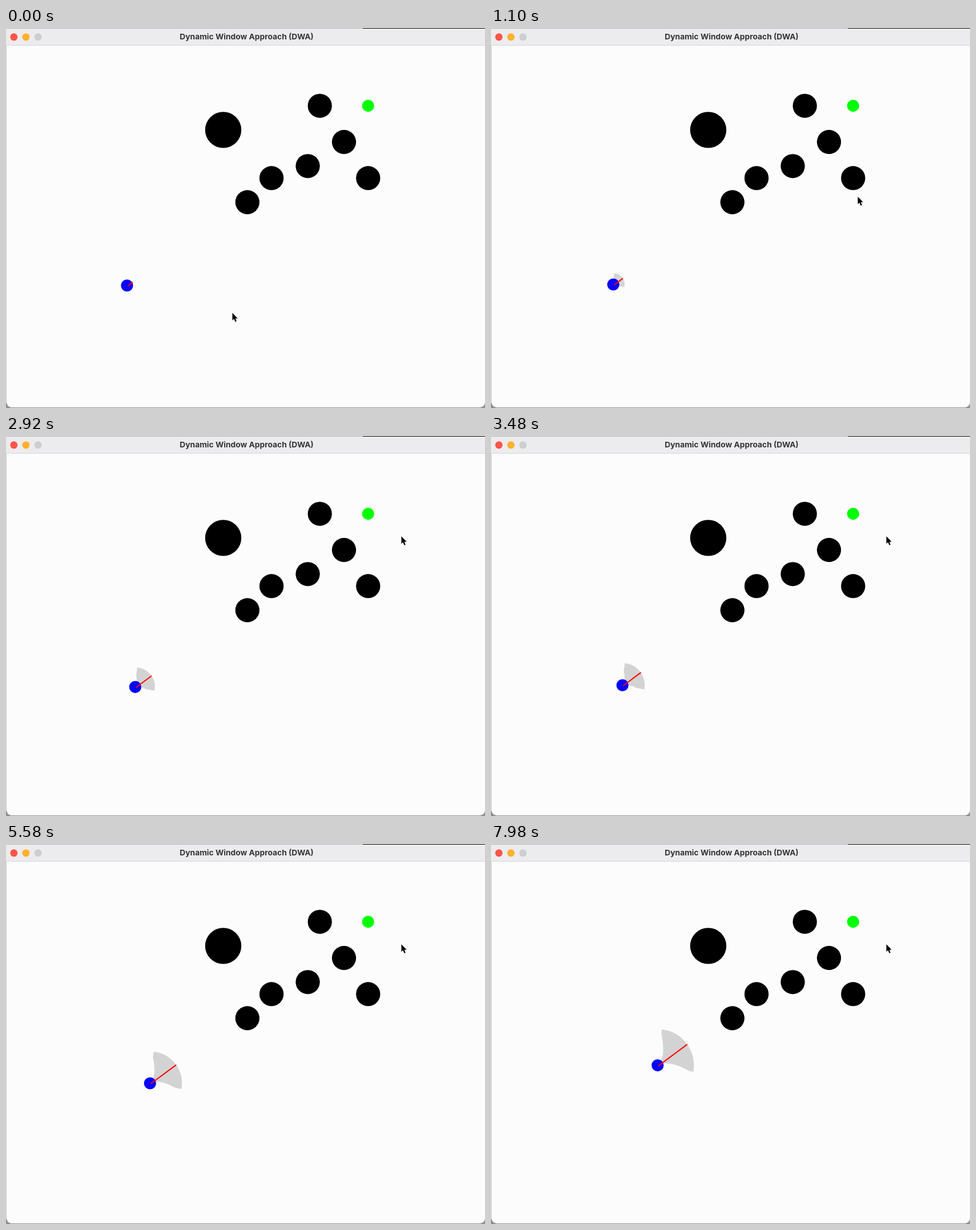
An HTML page with a canvas that plays this animation: 839x667 px, repeating every 8000 ms.

```html
<!DOCTYPE html>
<html lang="en">
<head>
<meta charset="utf-8">
<title>Dynamic Window Approach</title>
<style>
  html, body { margin: 0; width: 100%; height: 100%; overflow: hidden; background: #fcfcfd; }
  canvas { display: block; }
</style>
</head>
<body>
<canvas id="stage" width="839" height="667"></canvas>
<script>
const ctx = document.getElementById('stage').getContext('2d');
const LOOP = 8;        // seconds
const CELL = 21.15;    // pixels per world unit
const TITLE_BAR = 30.8;
const COURSE = -0.671; // direction of travel
const HEADING = -0.64; // direction of the look-ahead line

// seconds, distance driven
const driven = [[0, 0], [1.1, 2.8], [1.94, 12.1], [2.92, 18.4], [4.36, 31.2], [6.74, 70.7], [7.98, 102]];
// seconds, pointer position
const pointerPath = [[0, 396, 499], [1.1, 642, 295], [1.94, 655, 181], [2.2, 692, 175]];
// world column and row
const obstacles = [[26, 5], [28, 8], [30, 11], [25, 10], [22, 11], [20, 13]];

const linear = k => k;
const smooth = k => k * k * (3 - 2 * k);

function sample(keys, t, ease) {
  const next = keys.findIndex(key => key[0] > t);
  if (next < 0) return keys[keys.length - 1].slice(1);
  const a = keys[next - 1], b = keys[next];
  const k = ease((t - a[0]) / (b[0] - a[0]));
  return a.slice(1).map((v, i) => v + (b[i + 1] - v) * k);
}

function disc(x, y, r, color) {
  ctx.fillStyle = color;
  ctx.beginPath();
  ctx.arc(x, y, r, 0, Math.PI * 2);
  ctx.fill();
}

function worldDisc(column, row, r, color) {
  disc(column * CELL - 0.2, row * CELL + TITLE_BAR, r * CELL, color);
}

function rect(x, y, w, h, color) {
  ctx.fillStyle = color;
  ctx.fillRect(x, y, w, h);
}

function drawWindow() {
  rect(0, 0, 839, 667, '#8f8f90');
  rect(0, 30, 1, 628, '#c9c9cb');
  ctx.fillStyle = '#fcfcfd';
  ctx.beginPath();
  ctx.roundRect(1, 1, 838, 665, [0, 0, 9, 9]);
  ctx.fill();
  rect(0, 0, 839, 30, '#ececee');
  rect(0, 30, 839, 1, '#d6d6d7');
  rect(0, 0, 625, 1, '#b4b4b8');
  rect(625, 0, 214, 1, '#000');
  ['#ff5449', '#ffb02c', '#cbcfd0'].forEach((color, i) => disc(13.8 + i * 21.1, 15.8, 6.5, color));
  ctx.fillStyle = '#343436';
  ctx.font = '700 13.8px Inter, sans-serif';
  ctx.textAlign = 'center';
  ctx.fillText('Dynamic Window Approach (DWA)', 421.5, 20);
}

// Reachable area, drawn along the x axis with its origin at the robot
function drawFan(length) {
  const spread = 0.8;
  const depth = Math.max(7, Math.min(14, 14 - (length - 46) * 0.41));
  const inner = Math.max(2, length - depth);
  const ix = inner * Math.cos(spread), iy = inner * Math.sin(spread);
  ctx.beginPath();
  ctx.moveTo(0, 0);
  ctx.quadraticCurveTo(inner * 0.37, 0, ix, -iy);
  ctx.arc(0, 0, length - 1, -spread, spread);
  ctx.lineTo(ix, iy);
  ctx.quadraticCurveTo(inner * 0.37, 0, 0, 0);
  ctx.fillStyle = ctx.strokeStyle = '#d3d3d3';
  ctx.lineWidth = 2;
  ctx.lineJoin = 'round';
  ctx.fill();
  ctx.stroke();
}

function drawRobot(t) {
  const [distance] = sample(driven, t, linear);
  const length = Math.min(63.5, 11 + 8.05 * t);
  ctx.save();
  ctx.translate(212 + distance * Math.cos(COURSE), 452 + distance * Math.sin(COURSE));
  ctx.save();
  ctx.rotate(HEADING);
  if (length > 13) drawFan(length);
  ctx.restore();
  disc(0, 0, CELL / 2, '#00f');
  ctx.strokeStyle = '#f00';
  ctx.lineWidth = 2;
  ctx.beginPath();
  ctx.moveTo(1, 1);
  ctx.lineTo(1 + length * Math.cos(HEADING), 1 + length * Math.sin(HEADING));
  ctx.stroke();
  ctx.restore();
}

function drawPointer(t) {
  const [x, y] = sample(pointerPath, t, smooth);
  ctx.save();
  ctx.translate(x + 0.5, y + 1);
  ctx.scale(0.88, 0.92);
  ctx.beginPath();
  [[0, 0], [0, 14.5], [3.3, 11.5], [5.8, 17], [8.3, 16], [6, 10.6], [10.5, 10.6]]
    .forEach(point => ctx.lineTo(...point));
  ctx.closePath();
  ctx.strokeStyle = '#fff';
  ctx.lineWidth = 2;
  ctx.lineJoin = 'miter';
  ctx.stroke();
  ctx.fillStyle = '#000';
  ctx.fill();
  ctx.restore();
}

function draw(now) {
  const t = now / 1000 % LOOP;
  drawWindow();
  worldDisc(18, 7, 1.5, '#000');
  obstacles.forEach(([column, row]) => worldDisc(column, row, 1, '#000'));
  worldDisc(30, 5, 0.5, '#0f0');
  drawRobot(t);
  drawPointer(t);
  requestAnimationFrame(draw);
}

requestAnimationFrame(draw);
</script>
</body>
</html>
```
